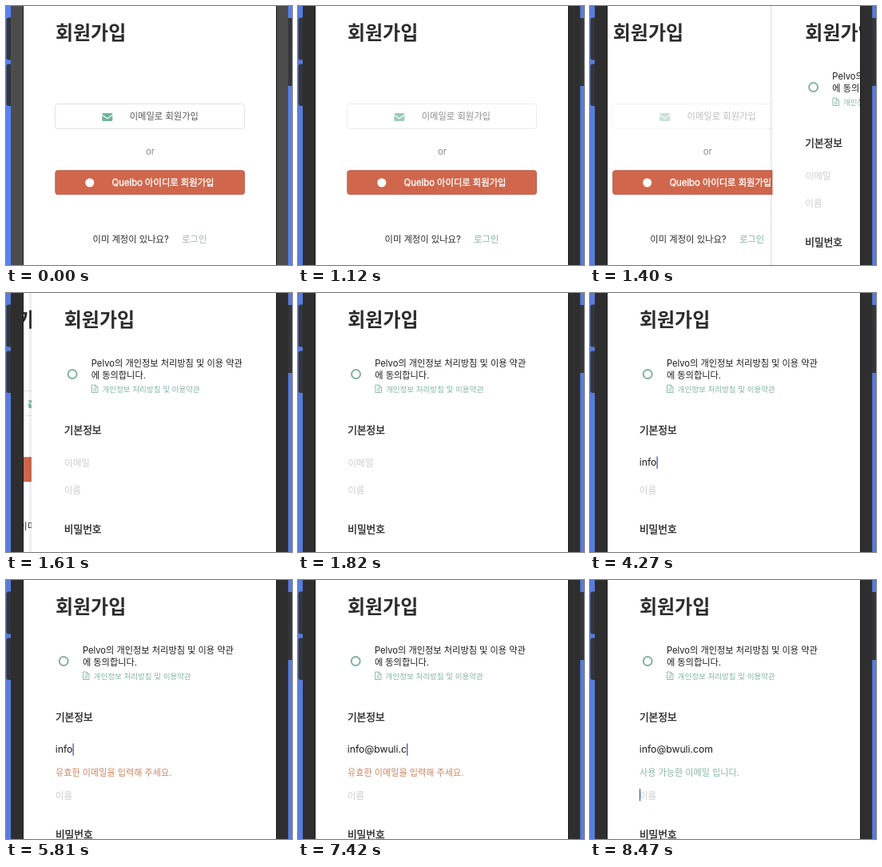
An HTML page for the animation above (8540 ms loop, 358x324 px).

```html
<!DOCTYPE html>
<html lang="ko">
<head>
<meta charset="utf-8">
<title>회원가입</title>
<style>
  html, body { margin: 0; width: 100%; height: 100%; overflow: hidden; background: #5b80dc; }
  svg { display: block; width: 358px; height: 324px; }
  text {
    font-family: Inter, "Noto Sans CJK KR", "Noto Sans CJK", sans-serif;
    font-size: 11.3px; fill: #2c2c2c; white-space: pre;
  }
  .title { font-size: 24px; font-weight: 700; fill: #2c2c2c; }
  .head { font-size: 12.7px; stroke: #262626; stroke-width: .35px; fill: #262626; }
  .hint { font-size: 11.6px; fill: #cdcdcd; }
  .terms { font-size: 11.2px; fill: #1c1c1c; }
  .link { font-size: 9.55px; fill: #82b5a3; }
  .note { font-size: 11.1px; }
  .typed { font-size: 12.2px; fill: #1c1c1c; }
  .mail { fill: #555; }
  .or { fill: #8a8a8a; }
  .brand { fill: #fff; stroke: #fff; stroke-width: .35px; }
</style>
</head>
<body>
<svg viewBox="0 0 358 324">
  <defs>
    <clipPath id="glass"><rect x="22" width="316" height="324"/></clipPath>
    <linearGradient id="shade">
      <stop offset="0" stop-color="#000" stop-opacity="0"/>
      <stop offset="1" stop-color="#000" stop-opacity=".09"/>
    </linearGradient>
  </defs>

  <rect id="backdrop" width="358" height="324"/>
  <g fill="#34363b">
    <rect x=".5" y="14.5" width="12" height="53" rx="3"/>
    <rect x=".5" y="72.5" width="12" height="52.5" rx="3"/>
    <rect x="347" y="15" width="15" height="85" rx="3"/>
  </g>
  <rect id="bezel" x="6" y="-4" width="347.2" height="332"/>
  <rect x="21.5" y="-4" width="317" height="332" fill="#fff" stroke="#1a1a1a"/>

  <g clip-path="url(#glass)">
    <g id="start">
      <text class="title" x="61.9" y="42.4">회원가입</text>
      <g id="mailButton">
        <rect x="61.5" y="122.5" width="237" height="31" rx="3" fill="#fff" stroke="#e2e2e2"/>
        <rect x="120.3" y="134" width="13" height="10" rx="1.6" fill="#6fb39c"/>
        <path d="M120.3 136.3L126.8 140.8L133.3 136.3" fill="none" stroke="#fff" stroke-width="1.1"/>
        <text class="mail" x="154.7" y="142.3">이메일로 회원가입</text>
      </g>
      <text class="or" x="175" y="186">or</text>
      <rect x="61.8" y="205.8" width="236.7" height="29.9" rx="3" fill="#d0674c" stroke="#b8634f"/>
      <circle cx="104.8" cy="221" r="5.5" fill="#fff"/>
      <text class="brand" x="132.6" y="225.3">Quelbo 아이디로 회원가입</text>
      <text x="108.5" y="295.7">이미 계정이 있나요?</text>
      <text id="login" x="220.1" y="295.7">로그인</text>
    </g>

    <g id="form">
      <rect x="16" width="5" height="324" fill="url(#shade)"/>
      <rect x="21" width="330" height="324" fill="#fff"/>
      <text class="title" x="61.9" y="42.4">회원가입</text>
      <circle cx="72.2" cy="101.5" r="5.5" fill="none" stroke="#83b1a2" stroke-width="2"/>
      <text class="terms" x="95.9" y="92">Pelvo의 개인정보 처리방침 및 이용 약관</text>
      <text class="terms" x="95.9" y="106.7">에 동의합니다.</text>
      <path d="M96.5 115h4.5l3 3v6.5h-7.5zM101 115v3h3M98.2 120h4M98.2 122.2h4"
            fill="none" stroke="#82b5a3" stroke-width=".9"/>
      <text class="link" x="109.6" y="123.9">개인정보 처리방침 및 이용약관</text>
      <text class="head" x="61.9" y="176">기본정보</text>
      <text class="hint" id="mailHint" x="62.1" y="216.7">이메일</text>
      <text class="typed" id="typed" x="61.8" y="216.2"></text>
      <text class="note" id="note" x="62.1" y="245"></text>
      <g id="lower">
        <text class="hint" x="61.8" y="250.5">이름</text>
        <text class="head" x="61.9" y="299.5">비밀번호</text>
      </g>
      <rect id="caret" width="1.4" height="15.2" fill="#4c63b4"/>
    </g>
  </g>
</svg>

<script>
const LOOP = 8540, STEP = 70, WIDTH = 318;
const PUSH = 1335;
const ADDRESS = "info@bwuli.com";
// Time at which each character of the address appears
const KEYS = [3500, 3710, 3920, 4270, 6230, 6580, 6720, 6860,
              7000, 7070, 7140, 7420, 7490, 7700];
const PRESS = [[980, 1], [1260, .35], [1400, .38], [1610, .9], [1680, 1]];
const BLINK = [[5180, 1], [5390, 0]];
const NOTES = [
  [0, "", ""],
  [4690, "유효한 이메일을 입력해 주세요.", "#cb8660"],
  [7980, "", ""],
  [8470, "사용 가능한 이메일 입니다.", "#86b5a4"]
];
// Focused field over time
const FOCUS = [[0, ""], [2940, "mail"], [4690, "name"], [5810, "mail"], [7980, "name"]];

const el = {};
document.querySelectorAll("svg [id]").forEach(e => el[e.id] = e);
const set = (e, name, value) => e.setAttribute(name, value);
const current = (table, t) => table.filter(row => row[0] <= t).pop();

function ramp(table, t) {
  if (t <= table[0][0]) return table[0][1];
  for (let i = 1; i < table.length; i++) {
    const [a, from] = table[i - 1], [b, to] = table[i];
    if (t <= b) return from + (to - from) * (t - a) / (b - a);
  }
  return table[table.length - 1][1];
}

function mix(a, b, k) {
  return `rgb(${a.map((v, i) => Math.round(v + (b[i] - v) * k))})`;
}

// Critically damped push: part of the way still to go
function remaining(t) {
  const x = Math.max(0, t - PUSH) * .0189;
  return (1 + x) * Math.exp(-x);
}

function draw(t) {
  const settle = Math.min(1, t / 210);
  set(el.backdrop, "fill", mix([88, 130, 240], [88, 124, 216], settle));
  set(el.bezel, "fill", mix([76, 76, 77], [46, 46, 47], settle));
  el.login.style.fill = mix([163, 178, 174], [134, 179, 164], settle);

  const rest = remaining(t);
  set(el.start, "transform", `translate(${-.3 * WIDTH * (1 - rest)})`);
  set(el.form, "transform", `translate(${WIDTH * rest})`);
  set(el.form, "visibility", t < PUSH ? "hidden" : "visible");
  set(el.mailButton, "opacity", ramp(PRESS, t));

  const count = KEYS.filter(k => k <= t).length;
  el.typed.textContent = ADDRESS.slice(0, count);
  el.mailHint.style.display = count ? "none" : "";

  const [, message, color] = current(NOTES, t);
  el.note.textContent = message;
  el.note.style.fill = color;
  const shift = message ? 23 : 0;
  set(el.lower, "transform", `translate(0 ${shift})`);

  const focus = current(FOCUS, t)[1];
  const onMail = focus === "mail";
  const typedWidth = onMail && count ? el.typed.getComputedTextLength() : 0;
  set(el.caret, "x", 61.8 + typedWidth);
  set(el.caret, "y", onMail ? 204.5 : 238.3 + shift);
  set(el.caret, "opacity", !focus ? 0 : t < 5810 ? ramp(BLINK, t) : 1);
}

const begin = performance.now();
function tick() {
  const t = (performance.now() - begin) % LOOP;
  draw(Math.floor(t / STEP) * STEP);
  requestAnimationFrame(tick);
}
tick();
</script>
</body>
</html>
```
